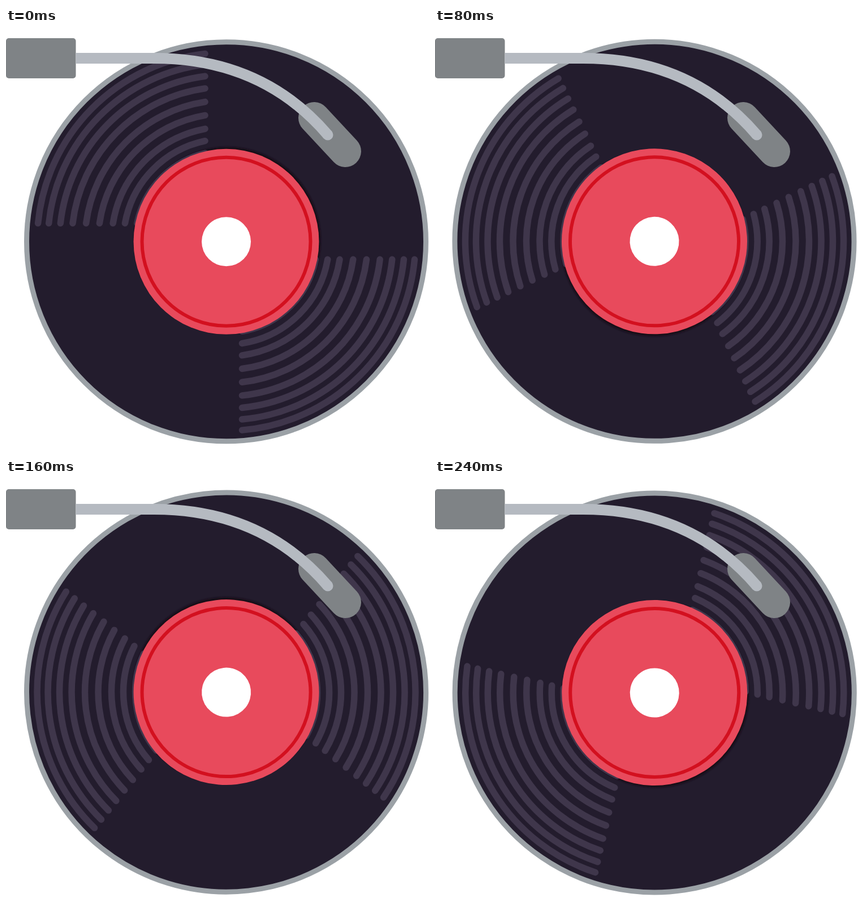
Write an HTML page that moves like this. It is 748 px wide and 748 px high and loops after 0.32 s.

```html
<!DOCTYPE html>
<html lang="en">
<head>
<meta charset="utf-8">
<title>Turntable</title>
<style>
  html, body { margin: 0; width: 100%; height: 100%; overflow: hidden; background: #fff; }
  svg { display: block; width: 100%; height: 100%; }
</style>
</head>
<body>
<svg viewBox="0 0 748 748">
  <defs>
    <filter id="soft"><feGaussianBlur stdDeviation="1.5"/></filter>
  </defs>
  <g id="record">
    <!-- slightly off centre, so the disc wobbles as it turns -->
    <g transform="translate(.7 .4)">
      <circle r="353" fill="#231c2d" stroke="#9ba1a6" stroke-width="9"/>
      <circle cx="2" cy="-2.5" r="165" fill="#120d19" filter="url(#soft)"/>
      <path id="grooves" fill="none" stroke="#3f364b" stroke-width="11.5" stroke-linecap="round"/>
      <circle r="164" fill="#e84a5c"/>
      <circle r="149" fill="none" stroke="#d3101f" stroke-width="6"/>
      <circle r="43.5" fill="#fff"/>
    </g>
  </g>
  <rect y="18" width="123.5" height="71" rx="5" fill="#7f8386"/>
  <path d="M545 159L600 218" stroke="#7f8386" stroke-width="56" stroke-linecap="round"/>
  <path d="M123.5 53.5H262C380 53.5 486 92 569 189" fill="none" stroke="#b5bac1" stroke-width="19"/>
  <circle cx="569" cy="189" r="9.5" fill="#b5bac1"/>
</svg>
<script>
  const STEP_MS = 80, STEPS = 4, STEP_DEG = 360 * 3 / 7;
  const RADII = [334.5, 315.5, 295, 273.5, 250, 226.5, 203, 182, 161];
  const record = document.getElementById('record');

  // Quarter arc in the quadrant given by side (-1 or 1), cut at straight gaps from both axes.
  function groove(r, side, gapX, gapY) {
    const x = Math.sqrt(r * r - gapY * gapY), y = Math.sqrt(r * r - gapX * gapX);
    return `M${side * gapX} ${side * y}A${r} ${r} 0 0 0 ${side * x} ${side * gapY}`;
  }

  document.getElementById('grooves').setAttribute('d',
    RADII.map(r => groove(r, -1, 37.5, 32.5) + groove(r, 1, 28, 31.5)).join(''));

  function draw() {
    const step = Math.floor(performance.now() / STEP_MS) % STEPS;
    record.setAttribute('transform', `translate(388.8 377.4) rotate(${step * STEP_DEG})`);
    requestAnimationFrame(draw);
  }
  draw();
</script>
</body>
</html>
```
